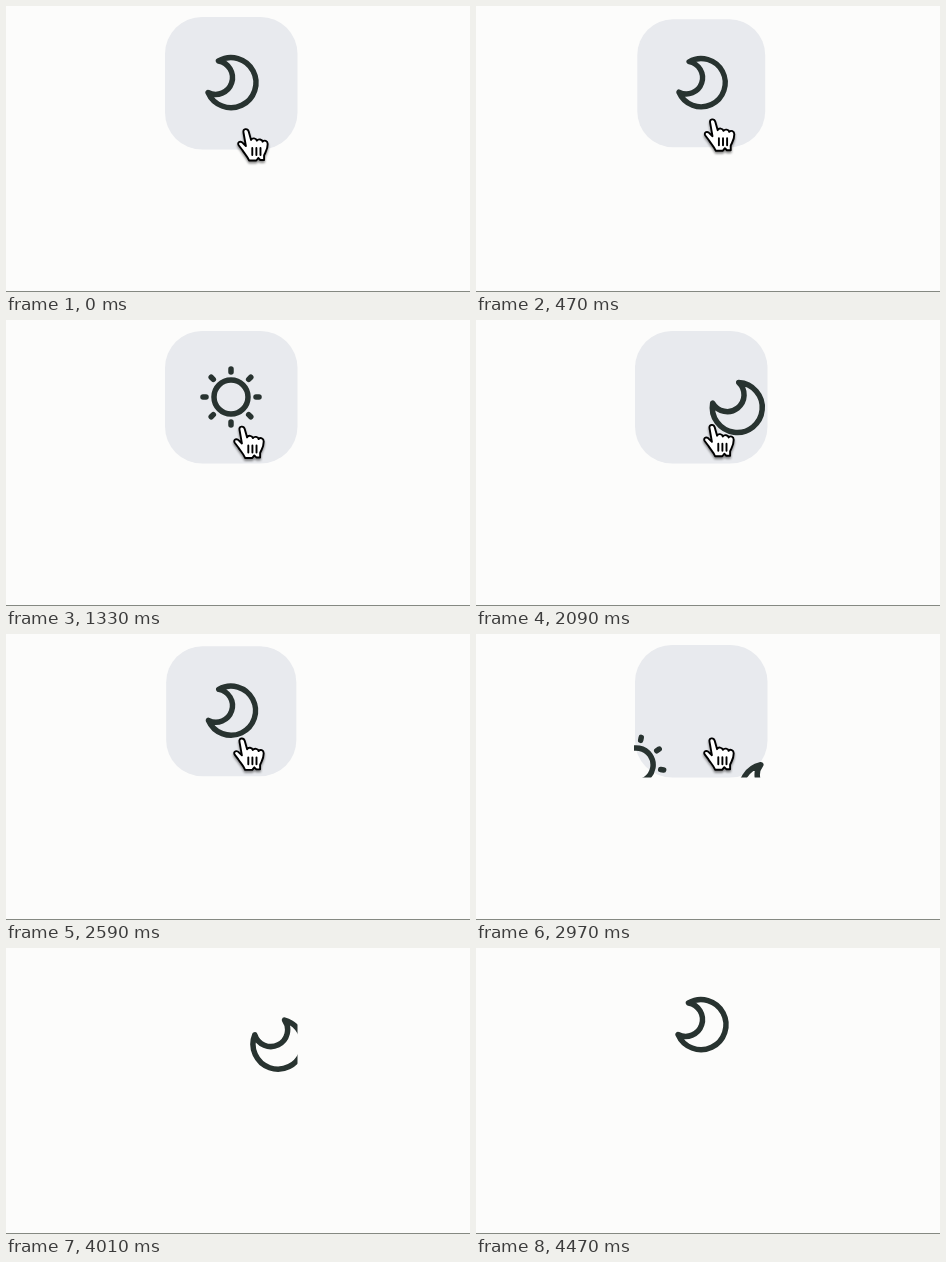
Recreate the animation shown at these times as an HTML page. Size 464 px wide and 286 px high, loop 5.01 s.

```html
<!DOCTYPE html>
<html lang="en">
<head>
<meta charset="utf-8">
<title>Theme toggle</title>
<style>
  html, body { margin: 0; width: 100%; height: 100%; overflow: hidden; background: #fcfcfb; }
  svg { display: block; width: 100vw; height: 100vh; }
  .icon { fill: none; stroke: #283330; stroke-width: 5.5; stroke-linecap: round; stroke-linejoin: round; }
  #cursor { filter: drop-shadow(0 2px 1px rgba(0, 0, 0, .45)); }
</style>
</head>
<body>
<svg viewBox="0 0 464 286">
  <defs>
    <clipPath id="box"><rect x="-67" y="-66.5" width="133.5" height="133"/></clipPath>
  </defs>
  <path d="M0 285.5H464" stroke="#858982"/>
  <g id="button">
    <rect id="hover" x="-66" y="-66" width="132.5" height="132.5" rx="37" fill="#e8eaee"/>
    <g clip-path="url(#box)">
      <g id="wheel" class="icon">
        <path d="M-12.5 -22A16.8 16.8 0 1 1 -23 9.5A25 25 0 1 0 -12.5 -22Z" transform="translate(0 -66)"/>
        <g id="sun" transform="translate(0 66)"><circle r="17"/></g>
      </g>
    </g>
  </g>
  <g id="cursor" stroke="#000" stroke-width="1.9" stroke-linecap="round" stroke-linejoin="round">
    <path fill="#fff" d="M-2.8 3C-3.8 -1 1.4 -1.5 2.4 2L4.8 10.5C5.8 8 10 8.5 10.5 11.2C12 9 16 9.8 16.3 12.2C18 10.2 21.4 11.2 21.4 14.5C21.4 20 19.5 22 17.8 26V30.5H14L12 28.5L10 31H2.8C1 26.5 -2 24 -4 20.5L-7.8 15.5C-9.2 12.5 -5.5 11 -3.2 13.8L-.4 16.5Z"/>
    <path fill="none" d="M6 18.5V25.5M10.1 18.5V25.5M14.2 18.5V25.5"/>
  </g>
</svg>
<script>
const LOOP = 5010, SPIN = 800, HOLD = 150, SQUEEZE = 100, LEAVE = 3740;
const CLICKS = [470, 1680, 2712, 3650];
const get = id => document.getElementById(id);
const clamp = v => Math.min(1, Math.max(0, v));

for (let i = 0; i < 8; i++) {
  const ray = document.createElementNS("http://www.w3.org/2000/svg", "path");
  ray.setAttribute("d", "M0 -25V-28");
  ray.setAttribute("transform", `rotate(${i * 45})`);
  get("sun").append(ray);
}

// CSS "ease": cubic-bezier(.25, .1, .25, 1)
function ease(x) {
  if (x <= 0 || x >= 1) return clamp(x);
  const curve = (a, b, s) => 3 * a * s * (1 - s) ** 2 + 3 * b * s * s * (1 - s) + s ** 3;
  let low = 0, high = 1;
  for (let i = 0; i < 24; i++) {
    const mid = (low + high) / 2;
    if (curve(.25, .25, mid) < x) low = mid; else high = mid;
  }
  return curve(.1, 1, low);
}

function draw(t) {
  let angle = 0, scale = 1;
  CLICKS.forEach((click, i) => {
    angle += (i % 2 ? -180 : 180) * ease((t - click) / SPIN);
    scale -= .035 * (ease((t - click + HOLD) / SQUEEZE) - ease((t - click) / SQUEEZE));
  });
  get("wheel").setAttribute("transform", `translate(0 66) rotate(${angle})`);
  get("button").setAttribute("transform", `translate(225 77) scale(${scale})`);
  get("hover").setAttribute("opacity", 1 - ease((t - LEAVE - 40) / 200));

  const exit = Math.max(0, t - LEAVE) / 50;
  const x = 236.3 + 4 * Math.exp(-t / 250) + 139 * exit ** 2;
  const y = 104.5 + 19 * Math.exp(-t / 650);
  get("cursor").setAttribute("transform", `translate(${x} ${y})`);
}

const start = performance.now();
function tick() {
  draw((performance.now() - start) % LOOP);
  requestAnimationFrame(tick);
}
tick();
</script>
</body>
</html>
```
